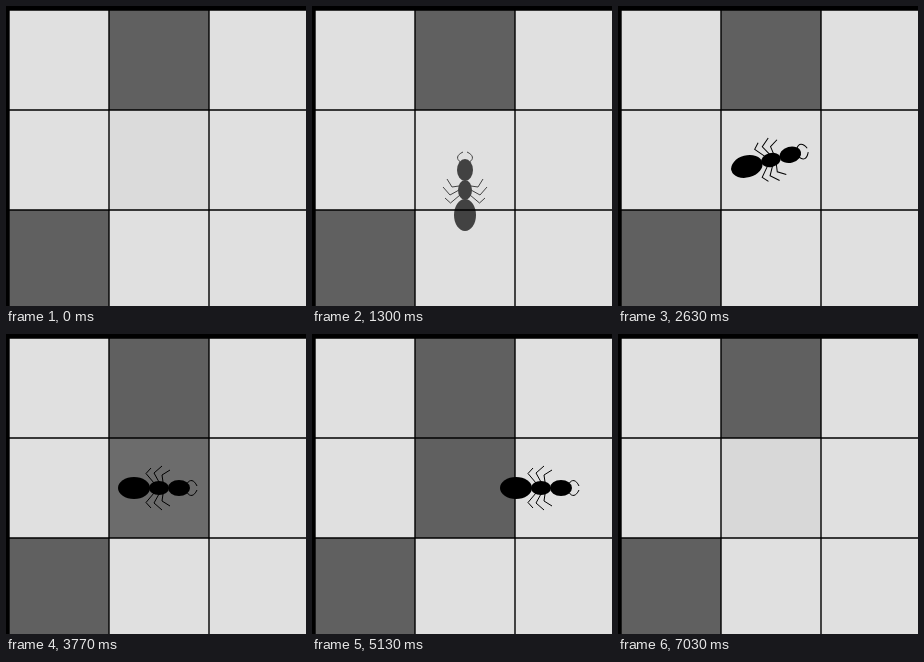
Write an HTML page that moves like this. It is 300 by 300 pixels and loops after 7630 ms.

```html
<!DOCTYPE html>
<html lang="en">
<head>
<meta charset="utf-8">
<title>Ant on a grid</title>
<style>
  html, body { margin: 0; width: 100%; height: 100%; overflow: hidden; background: #000; }
  svg { display: block; width: 100vw; height: 100vh; }
</style>
</head>
<body>
<svg viewBox="0 0 300 300">
  <rect x="3" y="4" width="300" height="300" fill="#e0e0e0"/>
  <rect x="103" y="4" width="100" height="100" fill="#606060"/>
  <rect x="3" y="204" width="100" height="100" fill="#606060"/>
  <rect id="cell" x="103" y="104" width="100" height="100"/>
  <path d="M3 0V300M103 0V300M203 0V300M0 4H300M0 104H300M0 204H300" stroke="#000" stroke-width="1.4"/>
  <g id="ant">
    <ellipse cy="25" rx="11" ry="16"/>
    <ellipse rx="7" ry="10"/>
    <ellipse cy="-20" rx="8" ry="11"/>
    <g id="side" fill="none" stroke="#000">
      <path d="M-4.5 -28C-9 -31 -8.5 -35 -2 -38"/>
      <path d="M-6 -4L-13 -3L-18 -11M-6 0L-15 5L-22 -3M-5 5L-14.5 13L-20 8"/>
    </g>
    <use href="#side" transform="scale(-1 1)"/>
  </g>
</svg>
<script>
const LOOP = 7630, TICK = 100 / 3;
const LIGHT = 224, DARK = 96, SHADE = 4;
const cell = document.getElementById('cell');
const ant = document.getElementById('ant');

const ramp = (k, from, to) => Math.min(1, Math.max(0, (k - from) / (to - from)));

// Latest shading step reached, or undefined before the first
const reached = (k, steps) => steps.filter(s => s <= k).pop();

function cellGray(k) {
  if (k < 7) return 219;
  const light = reached(k, [186, 191, 196, 201, 206, 211]);
  if (light) return DARK + SHADE * (light - 181);
  const dark = reached(k, [89, 94, 99, 104, 109, 113, 117]);
  return dark ? Math.max(DARK, LIGHT - SHADE * (dark - 84)) : LIGHT;
}

function draw(t) {
  const k = Math.floor((t + 3.4) / TICK);
  const gray = cellGray(k);
  cell.setAttribute('fill', `rgb(${gray},${gray},${gray})`);

  const enter = ramp(k, 4, 54);
  const x = 153 + 100 * ramp(k, 116, 166);
  const y = 254 - 100 * enter;
  const turn = 90 * ramp(k, 54, 84);
  ant.setAttribute('transform', `translate(${x} ${y}) rotate(${turn})`);

  const visible = k >= 7 && k < 208;
  ant.setAttribute('opacity', visible ? enter * (1 - ramp(k, 166, 211)) : 0);
}

const start = performance.now();
function loop() {
  draw((performance.now() - start) % LOOP);
  requestAnimationFrame(loop);
}
loop();
</script>
</body>
</html>
```
